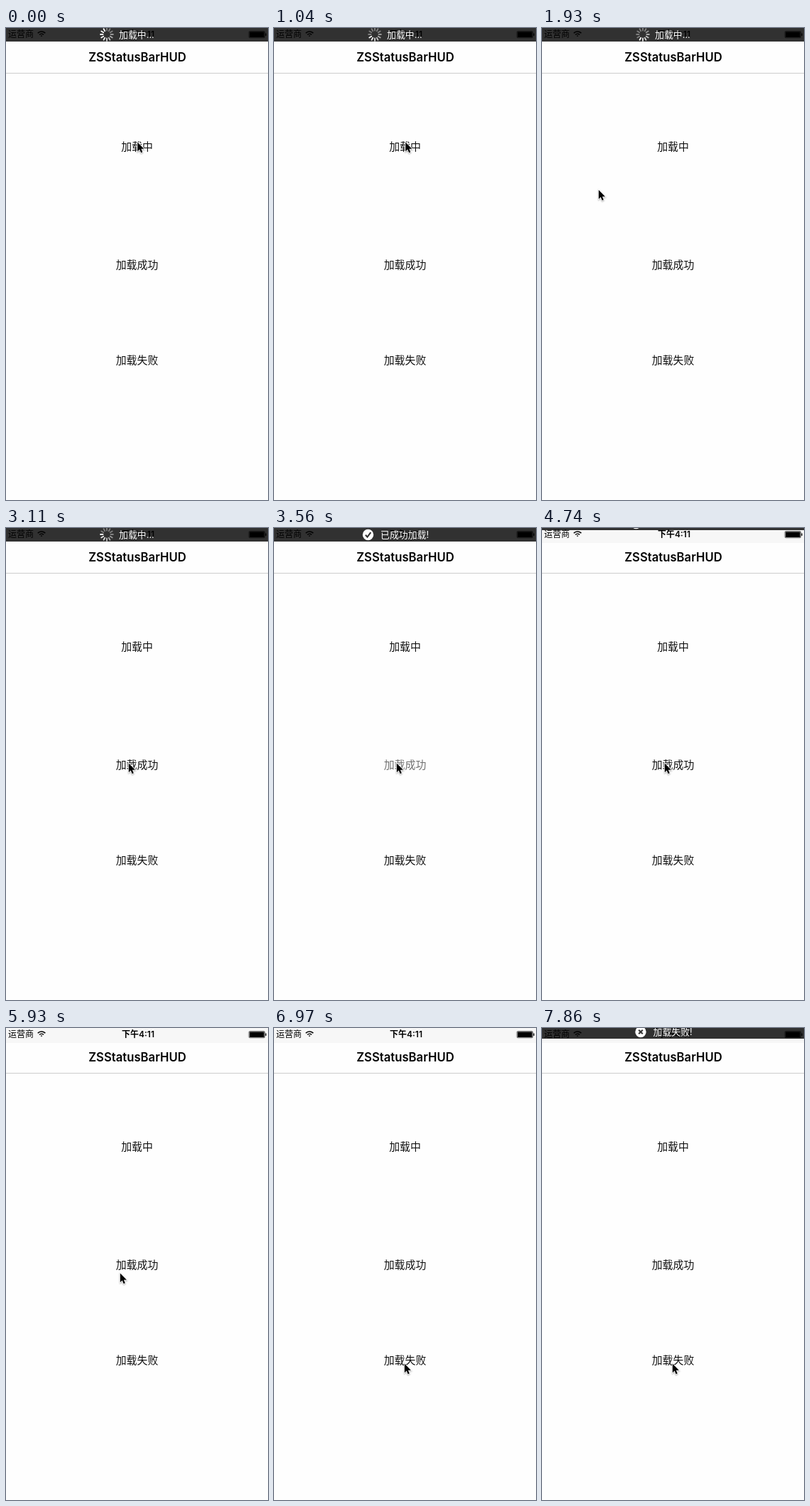
These frames come from a looping animation (369x663 px, 8000 ms). An HTML page with a canvas:

```html
<!DOCTYPE html>
<html lang="zh">
<head>
<meta charset="utf-8">
<title>ZSStatusBarHUD</title>
<style>
  html, body { margin: 0; width: 100%; height: 100%; overflow: hidden; background: #fefefe; }
  canvas { display: block; }
</style>
</head>
<body>
<canvas></canvas>
<script>
const W = 369, H = 663, LOOP = 8000, STEP = 148.1, LAST_STEP = 53;
const FONT = 'Inter, "Noto Sans CJK SC", "Noto Sans CJK", sans-serif';
const canvas = document.querySelector('canvas');
const ctx = canvas.getContext('2d');
const ratio = window.devicePixelRatio || 1;
canvas.width = W * ratio;
canvas.height = H * ratio;
canvas.style.width = W + 'px';
canvas.style.height = H + 'px';

// Pointer tip as [step, x, y], linear in between
const pointerPath = [
  [0, 185, 160], [8, 185, 160], [11, 182, 165], [12, 168, 178], [13, 79.5, 227],
  [14, 72, 270], [15, 90, 325], [16, 128, 346], [18, 160, 339], [20, 172.5, 330],
  [39, 172.5, 330], [40, 160.5, 344], [41, 142, 372], [42, 134, 415], [43, 145, 470],
  [44, 164, 498], [45, 178, 488], [46, 183.5, 471], [53, 183.5, 471]
];

function pointerAt(step) {
  const i = Math.max(1, pointerPath.findIndex(p => p[0] >= step));
  const [s0, x0, y0] = pointerPath[i - 1], [s1, x1, y1] = pointerPath[i];
  const f = (step - s0) / (s1 - s0);
  return [x0 + (x1 - x0) * f, y0 + (y1 - y0) * f];
}

function rect(x, y, w, h, color) {
  ctx.fillStyle = color;
  ctx.fillRect(x, y, w, h);
}

// Text is placed by the middle of its glyphs
function text(str, x, midY, size, { color = '#000', weight = 400, align = 'left', alpha = 1 } = {}) {
  ctx.font = `${weight} ${size}px ${FONT}`;
  ctx.textAlign = align;
  ctx.fillStyle = color;
  ctx.globalAlpha = alpha;
  ctx.fillText(str, x, midY + size * 0.37);
  ctx.globalAlpha = 1;
}

function line(points, color, width) {
  ctx.beginPath();
  points.forEach(([x, y]) => ctx.lineTo(x, y));
  ctx.strokeStyle = color;
  ctx.lineWidth = width;
  ctx.stroke();
}

function drawStatusBar() {
  rect(0, 0, W, 21, '#f7f7f7');
  text('运营商', 3, 9, 12);
  ctx.strokeStyle = '#000';
  ctx.lineWidth = 1.6;
  for (const r of [1, 4, 7.2]) {
    ctx.beginPath();
    ctx.arc(50, 12.2, r, -Math.PI * 0.76, -Math.PI * 0.24);
    ctx.stroke();
  }
  text('下午4:11', 186, 9, 12, { weight: 600, align: 'center' });
  ctx.lineWidth = 0.6;
  ctx.beginPath();
  ctx.roundRect(342, 4.6, 22.6, 9.2, 1.6);
  ctx.stroke();
  rect(343, 5.4, 20.6, 7.6, '#000');
  rect(365.3, 7.5, 1.3, 3.4, '#000');
}

function drawSpinner(time) {
  const head = 8 + Math.floor(time * 12 / 1000);
  ctx.save();
  ctx.translate(142, 9);
  ctx.lineCap = 'round';
  for (let i = 0; i < 12; i++) {
    const age = (head - i) % 12;
    ctx.save();
    ctx.rotate(i * Math.PI / 6);
    line([[0, -5.5], [0, -8.9]], `rgba(255,255,255,${Math.max(0.38, 1 - age * 0.1)})`, 1.8);
    ctx.restore();
  }
  ctx.restore();
}

function drawBadge(x, strokes) {
  ctx.save();
  ctx.translate(x, 9.5);
  ctx.fillStyle = '#fff';
  ctx.beginPath();
  ctx.arc(0, 0, 7.7, 0, Math.PI * 2);
  ctx.fill();
  strokes.forEach(points => line(points, '#323232', 2.1));
  ctx.restore();
}

function drawHud(step, time) {
  let lift = 0;
  if (step >= 50) lift = 4 + (LAST_STEP - step) * 7;
  else if (step >= 30) lift = 2 + (step - 30) * 7;
  if (lift > 19) return;
  ctx.save();
  ctx.translate(0, -lift);
  rect(0, 0, W, 19, 'rgba(0,0,0,0.8)');
  const white = { color: '#fff' };
  if (step < 24) {
    drawSpinner(time);
    text('加载中...', 159, 9, 12.9, white);
  } else if (step < 50) {
    drawBadge(132.5, [[[-3.6, 0.3], [-1, 3.2], [3.8, -3.4]]]);
    text('已成功加载!', 150, 9.3, 12.9, white);
  } else {
    drawBadge(139, [[[-2.8, -2.8], [2.8, 2.8]], [[2.8, -2.8], [-2.8, 2.8]]]);
    text('加载失败!', 156.5, 9.5, 12.9, white);
  }
  ctx.restore();
}

function drawPointer(step) {
  ctx.save();
  ctx.translate(...pointerAt(step));
  ctx.shadowColor = 'rgba(0,0,0,0.35)';
  ctx.shadowBlur = 2 * ratio;
  ctx.shadowOffsetY = ratio;
  ctx.lineJoin = 'miter';
  const arrow = new Path2D('M0.3 0.5V13.2L3.2 10.5L5.2 15.2L7.3 14.3L5.4 9.8H9.4Z');
  ctx.strokeStyle = '#fff';
  ctx.lineWidth = 1.6;
  ctx.stroke(arrow);
  ctx.shadowColor = 'transparent';
  ctx.fillStyle = '#000';
  ctx.fill(arrow);
  ctx.restore();
}

// A pressed label dims, then recovers over two steps
function pressAlpha(step, pressedAt) {
  return [0.2, 0.6][step - pressedAt] ?? 1;
}

function draw(time) {
  const step = Math.min(LAST_STEP, Math.floor(time / STEP));
  ctx.setTransform(ratio, 0, 0, ratio, 0, 0);
  rect(0, 0, W, H, '#fefefe');
  drawStatusBar();
  rect(0, 63, W, 1, '#cdcdcd');
  text('ZSStatusBarHUD', 185, 41, 16.7, { weight: 600, align: 'center' });
  const label = { color: '#111', align: 'center' };
  text('加载中', 184.5, 166.3, 14.9, label);
  text('加载成功', 184.5, 332.7, 14.9, { ...label, alpha: pressAlpha(step, 23) });
  text('加载失败', 184.5, 466.3, 14.9, { ...label, alpha: pressAlpha(step, 50) });
  drawHud(step, step * STEP);
  drawPointer(step);
}

function tick() {
  draw(performance.now() % LOOP);
  requestAnimationFrame(tick);
}
tick();
</script>
</body>
</html>
```
